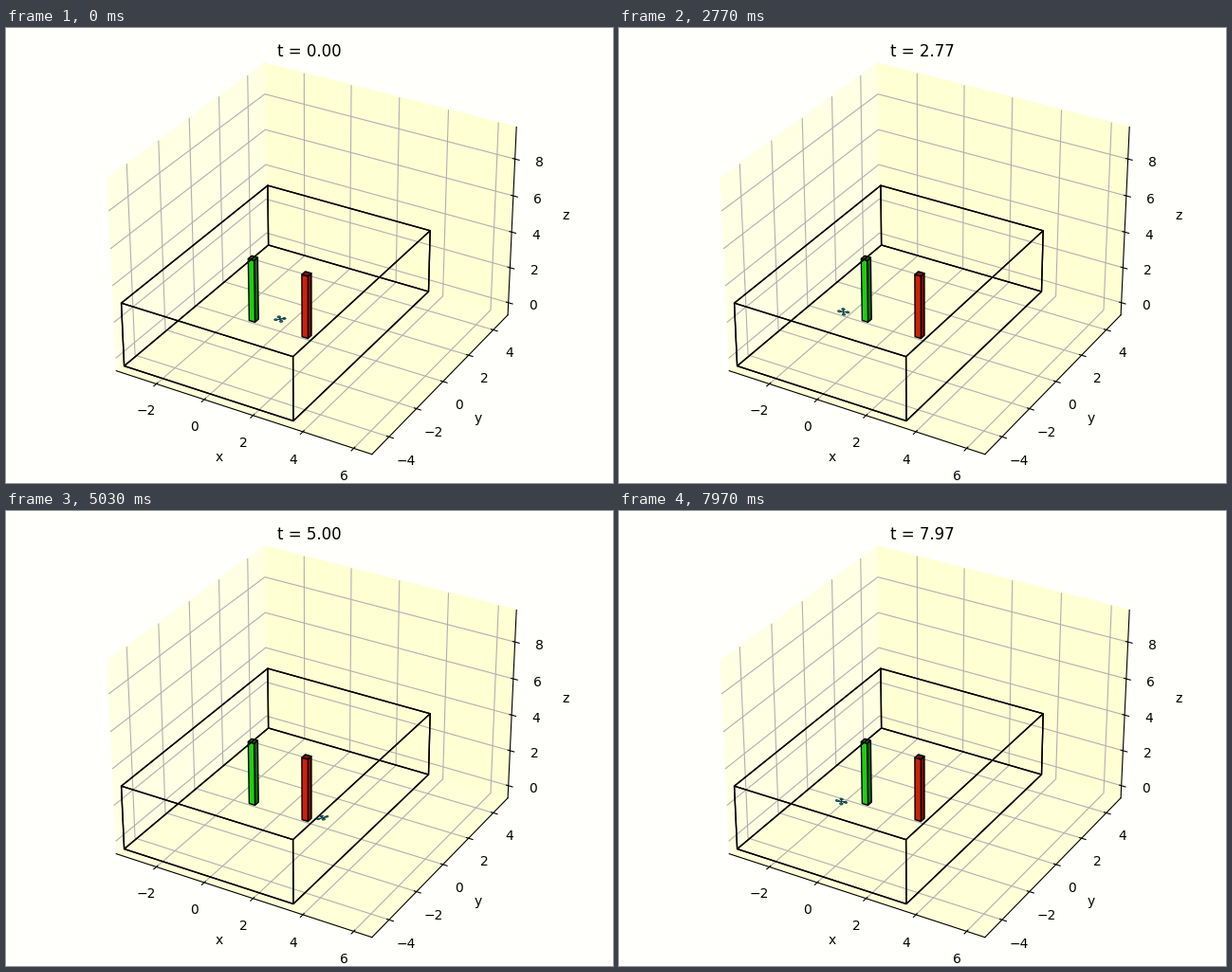
A matplotlib script for the animation above (8 s loop, 640x480 px).

```python
import numpy as np
import matplotlib.pyplot as plt
from matplotlib.animation import FuncAnimation
from mpl_toolkits.mplot3d.art3d import Poly3DCollection

FPS, FRAMES = 30, 240
BG = "#fffffb"
PAD = 10 / 48          # margin added to each 10-unit axis

# flight: settle from rest at the origin onto a circle
RADIUS, OMEGA, LAG, RATE = 1.89, 2 * np.pi / 5, 0.085, 3.0
GRAVITY, MAX_ACC = 9.81, 5.0
ARM, ROTOR = 0.16, 0.062


def box_faces(x0, x1, y0, y1, z0, z1):
    """Faces in the order front, right, top, back, left, bottom."""
    def p(i, j, k):
        return ((x0, x1)[i], (y0, y1)[j], (z0, z1)[k])
    return [
        [p(0, 0, 0), p(1, 0, 0), p(1, 0, 1), p(0, 0, 1)],
        [p(1, 0, 0), p(1, 1, 0), p(1, 1, 1), p(1, 0, 1)],
        [p(0, 0, 1), p(1, 0, 1), p(1, 1, 1), p(0, 1, 1)],
        [p(0, 1, 0), p(1, 1, 0), p(1, 1, 1), p(0, 1, 1)],
        [p(0, 0, 0), p(0, 1, 0), p(0, 1, 1), p(0, 0, 1)],
        [p(0, 0, 0), p(1, 0, 0), p(1, 1, 0), p(0, 1, 0)],
    ]


def position(t):
    """Horizontal position as a complex number."""
    a = RADIUS * np.exp(-1j * LAG)
    b = (RATE + 1j * OMEGA) * a
    return a * np.exp(1j * OMEGA * t) - (a + b * t) * np.exp(-RATE * t)


def body_axes(t):
    h = 0.01
    acc = (position(t + h) - 2 * position(t) + position(t - h)) / h**2
    acc *= min(1, MAX_ACC / abs(acc)) * min(1, t / 0.2)
    up = np.array([acc.real, acc.imag, GRAVITY])
    up /= np.linalg.norm(up)
    yaw = 0.45 * np.sin(OMEGA * t)
    side = np.cross(up, [np.cos(yaw), np.sin(yaw), 0])
    side /= np.linalg.norm(side)
    return np.cross(side, up), side


def drone_polys(t):
    pos = position(t)
    center = np.array([pos.real, pos.imag, 0])
    fwd, side = body_axes(t)
    ring = np.linspace(0, 2 * np.pi, 10, endpoint=False)
    circle = ROTOR * (np.outer(np.cos(ring), fwd) + np.outer(np.sin(ring), side))
    tips = [center + ARM * (np.cos(a) * fwd + np.sin(a) * side)
            for a in np.pi / 4 + np.pi / 2 * np.arange(4)]
    arms = [np.array([tips[i], center, tips[i + 2]]) for i in (0, 1)]
    return arms + [tip + circle for tip in tips], pos


fig = plt.figure(figsize=(6.4, 4.8), dpi=100, facecolor=BG)
ax = fig.add_axes([0, 0, 1, 1], projection="3d", computed_zorder=False)
ax.set_facecolor(BG)
ax.view_init(elev=30, azim=-60)

for axis, color in ((ax.xaxis, "#ffffe4"), (ax.yaxis, "#ffffd4"),
                    (ax.zaxis, "#ffffd8")):
    axis.set_pane_color(color)

pillars = (
    (-1.25, 4, ("#1fd00f", "#0b6a05", "#0f7a0a")),
    (1.0, 6, ("#d0200a", "#6e0d05", "#7a1008")),
)
for x, order, colors in pillars:
    faces = box_faces(x, x + 0.25, -0.125, 0.125, -0.5, 3)[:3]
    ax.add_collection3d(Poly3DCollection(
        faces, facecolors=colors, edgecolors="black", linewidths=1,
        zorder=order))

room = Poly3DCollection(box_faces(-3.5, 3.5, -5, 5, -0.5, 3),
                        facecolors=[(0, 0, 0, 0)], edgecolors="black",
                        linewidths=1, zorder=10)
ax.add_collection3d(room)

drone = Poly3DCollection(drone_polys(0)[0], facecolors="#2f7f88",
                         edgecolors="#123f48", linewidths=0.6)
ax.add_collection3d(drone)

ax.set_xlim(-3.5 - PAD, 6.5 + PAD)
ax.set_ylim(-5 - PAD, 5 + PAD)
ax.set_zlim(-0.5 - PAD, 9.5 + PAD)
ax.set_xlabel("x")
ax.set_ylabel("y")
ax.set_zlabel("z")

clock = fig.text(0.5, 449.93 / 480, "t = 0.00", fontsize=12, ha="center")


def update(frame):
    t = frame / FPS
    polys, pos = drone_polys(t)
    drone.set_verts(polys)
    # nearness to the camera decides which pillars hide the drone
    near = 0.433 * pos.real - 0.75 * pos.imag
    drone.set_zorder(3 + 2 * (near > -0.487) + 2 * (near > 0.487))
    clock.set_text(f"t = {t:.2f}")
    return drone, clock


anim = FuncAnimation(fig, update, frames=FRAMES, interval=1000 / FPS,
                     repeat=True, repeat_delay=0, blit=False)
plt.show()
```
